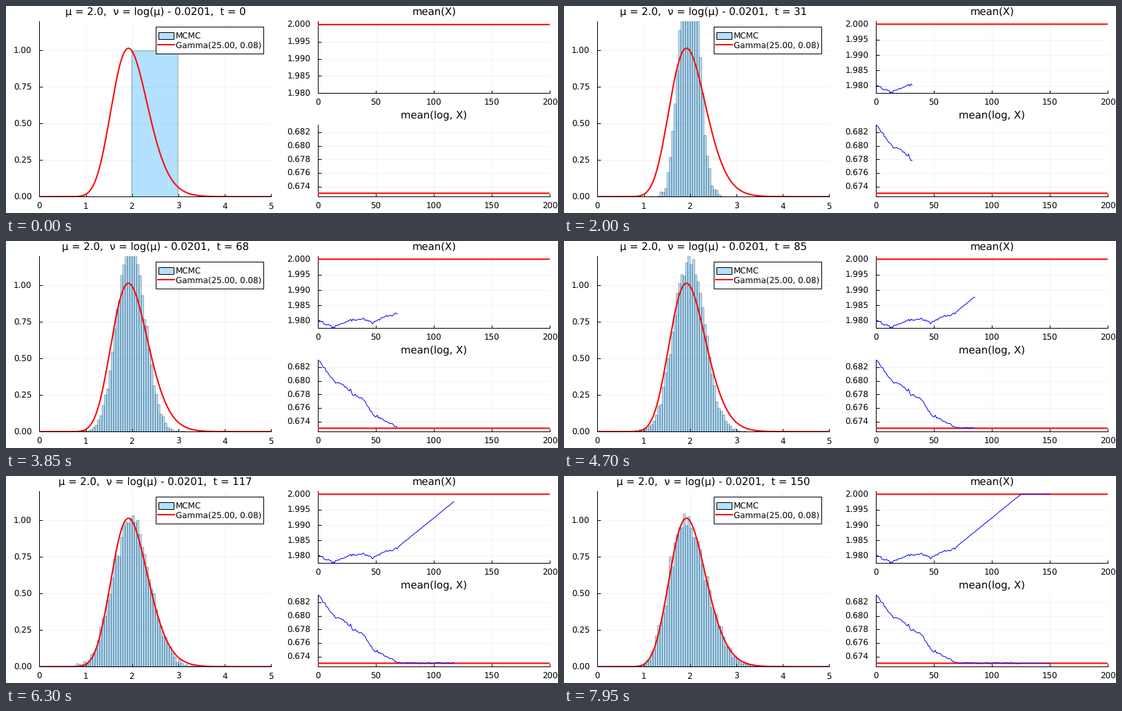
A matplotlib script that plays this animation: 800 px wide and 300 px high, repeating every 8 s.

```python
import math

import matplotlib.pyplot as plt
import numpy as np
from matplotlib.animation import FuncAnimation
from matplotlib.collections import PolyCollection
from matplotlib.lines import Line2D
from matplotlib.patches import Rectangle
from matplotlib.transforms import Affine2D

W, H = 800, 300
STEP_MS, HOLD, T_END = 50, 9, 150
MU, SHAPE, SCALE = 2.0, 25, 0.08
NU = math.log(MU) - 0.020133
START = 1.98
N = 10_000
UNIT = 1e-4
TITLE, SMALL = 14.85, 11.85
FILL = (0, 154 / 255, 250 / 255, 0.3)
EDGE = (0, 0, 0, 0.3)

plt.rcParams.update({
    "font.family": "DejaVu Sans",
    "text.hinting": "none",
    "axes.linewidth": 1,
})

rng = np.random.default_rng(12)
steps = np.arange(T_END + 1)


def trace(t, v, jitter):
    """Drift through a few key points, noisy until the mean settles."""
    noise = rng.normal(0, 1, steps.size) * np.where(steps < 69, jitter, 0.5)
    noise[(steps == 0) | (steps > 123)] = 0
    return UNIT * (np.interp(steps, t, v) + noise)


mean_x = START + trace([0, 14, 27, 38, 47, 68, 125],
                       [0, -21, 3, 6, -5, 26, 200], 2.5)
mean_log = NU + trace([0, 14, 26, 31, 39, 47, 69, 124],
                      [100.6, 69, 59, 49, 42, 21, 0.5, 0], 1.3)

walk = np.cumsum(rng.normal(0, 1, (T_END, N)), axis=0)


def sample(t):
    """Diffusing values that skew toward the gamma shape late on."""
    z = walk[t - 1] / math.sqrt(t)
    sd = math.sqrt(0.00131 * min(t, 122))
    skew = np.interp(t, [101, 150], [0, 0.38])
    return mean_x[t] + sd * (z + skew / 6 * (z * z - 1))


def nice_width(w):
    """Round a bin width to 1, 2, 5 or 10 times a power of ten."""
    base = 10.0 ** math.floor(math.log10(w))
    r = w / base
    return base * (1 if r <= 1.1 else 2 if r <= 2.2 else 5 if r <= 5.5 else 10)


def bars(t):
    if t == 0:
        left, height, w = [START], [1.0], 1.0
    else:
        x = sample(t)
        q1, q3 = np.percentile(x, [25, 75])
        w = nice_width(2 * (q3 - q1) / N ** (1 / 3))
        k = np.floor(x / w).astype(int)
        count = np.bincount(k - k.min())
        left = (k.min() + np.arange(count.size)) * w
        height = count / (N * w)
    return [[(a, 0), (a, h), (a + w, h), (a + w, 0)]
            for a, h in zip(left, height) if h > 0]


fig = plt.figure(figsize=(W / 72, H / 72), dpi=72, facecolor="white")
px = Affine2D().scale(1 / W, -1 / H).translate(0, 1) + fig.transFigure


def label(x, y, s, size, ha="center"):
    return fig.text(x, y, s, transform=px, size=size, ha=ha, va="baseline")


def panel(x0, y0, y1, xlim, ylim, xticks, yticks, fmt):
    ax = fig.add_axes([x0 / W, 1 - y1 / H, 336 / W, (y1 - y0) / H])
    ax.set(xlim=xlim, ylim=ylim, xticks=xticks, yticks=yticks)
    ax.patch.set_visible(False)
    ax.set_axisbelow(True)
    ax.grid(True, color="black", alpha=0.1, lw=0.5)
    ax.tick_params(direction="in", length=4.5, width=1,
                   labelbottom=False, labelleft=False)
    ax.spines[["top", "right"]].set_visible(False)
    for side in ("left", "bottom"):
        ax.spines[side].set_zorder(1)
    opts = dict(textcoords="offset points", size=SMALL, va="baseline",
                annotation_clip=False)
    for v in xticks:
        ax.annotate(str(v), (v, 0), xycoords=("data", "axes fraction"),
                    xytext=(-0.4, -17.5), ha="center", **opts)
    for v in yticks:
        ax.annotate(fmt % v, (0, v), xycoords=("axes fraction", "data"),
                    xytext=(-11.1, -4.3), ha="right", **opts)
    return ax


def curve(ax, x, y, color, lw, z):
    return ax.plot(x, y, color=color, lw=lw, zorder=z, snap=False)[0]


weeks = range(0, 201, 50)
ax_hist = panel(48.4, 21.9, 276.3, (0, 5), (0, 1.2), range(6),
                np.linspace(0, 1, 5), "%.2f")
ax_x = panel(452.4, 21.9, 126.2, (0, 200), (START, MU + 0.001),
             weeks, np.linspace(1.98, 2, 5), "%.3f")
ax_log = panel(452.4, 172, 276.3, (0, 200), (NU - 0.0005, math.log(START)),
               weeks, np.linspace(0.674, 0.682, 5), "%.3f")

title = label(216.5, 13.2, "", TITLE)
label(620.2, 13.2, "mean(X)", TITLE)
label(620.2, 163.2, "mean(log, X)", TITLE)

hist = PolyCollection([], facecolors=[FILL], edgecolors=[EDGE],
                      linewidths=1, snap=False, zorder=2)
ax_hist.add_collection(hist, autolim=False)

grid = np.linspace(0.005, 5, 600)
log_pdf = ((SHAPE - 1) * np.log(grid) - grid / SCALE
           - math.lgamma(SHAPE) - SHAPE * math.log(SCALE))
curve(ax_hist, grid, np.exp(log_pdf), "red", 2, 3)
curve(ax_x, [0, 200], [MU, MU], "red", 2, 2)
curve(ax_log, [0, 200], [NU, NU], "red", 2, 2)
line_x = curve(ax_x, [], [], "blue", 1, 3)
line_log = curve(ax_log, [], [], "blue", 1, 3)


def box(x, y, w, h, face, z):
    fig.add_artist(Rectangle((x, y), w, h, transform=px, fc=face, ec="black",
                             lw=1, zorder=z))


box(217, 30, 156, 39, "white", 4)
box(221, 38, 22, 10, "#b2e0fd", 5)
fig.add_artist(Line2D([220.2, 243.7], [56.4, 56.4], transform=px, color="red",
                      lw=2, zorder=5))
for y, s in ((47.4, "MCMC"), (60.4, "Gamma(25.00, 0.08)")):
    label(245.5, y, s, SMALL, "left").set_zorder(6)


def update(i):
    t = max(0, i - HOLD)
    title.set_text(f"μ = 2.0,  ν = log(μ) - 0.0201,  t = {t}")
    hist.set_verts(bars(t))
    seen = slice(0, t + 1)
    line_x.set_data(steps[seen], mean_x[seen])
    line_log.set_data(steps[seen], mean_log[seen])
    ax_x.set_ylim(mean_x[seen].min(), MU + 0.001)
    return title, hist, line_x, line_log


anim = FuncAnimation(fig, update, frames=T_END + HOLD + 1, interval=STEP_MS,
                     init_func=lambda: update(0), repeat=True, repeat_delay=0,
                     blit=False)
plt.show()
```
